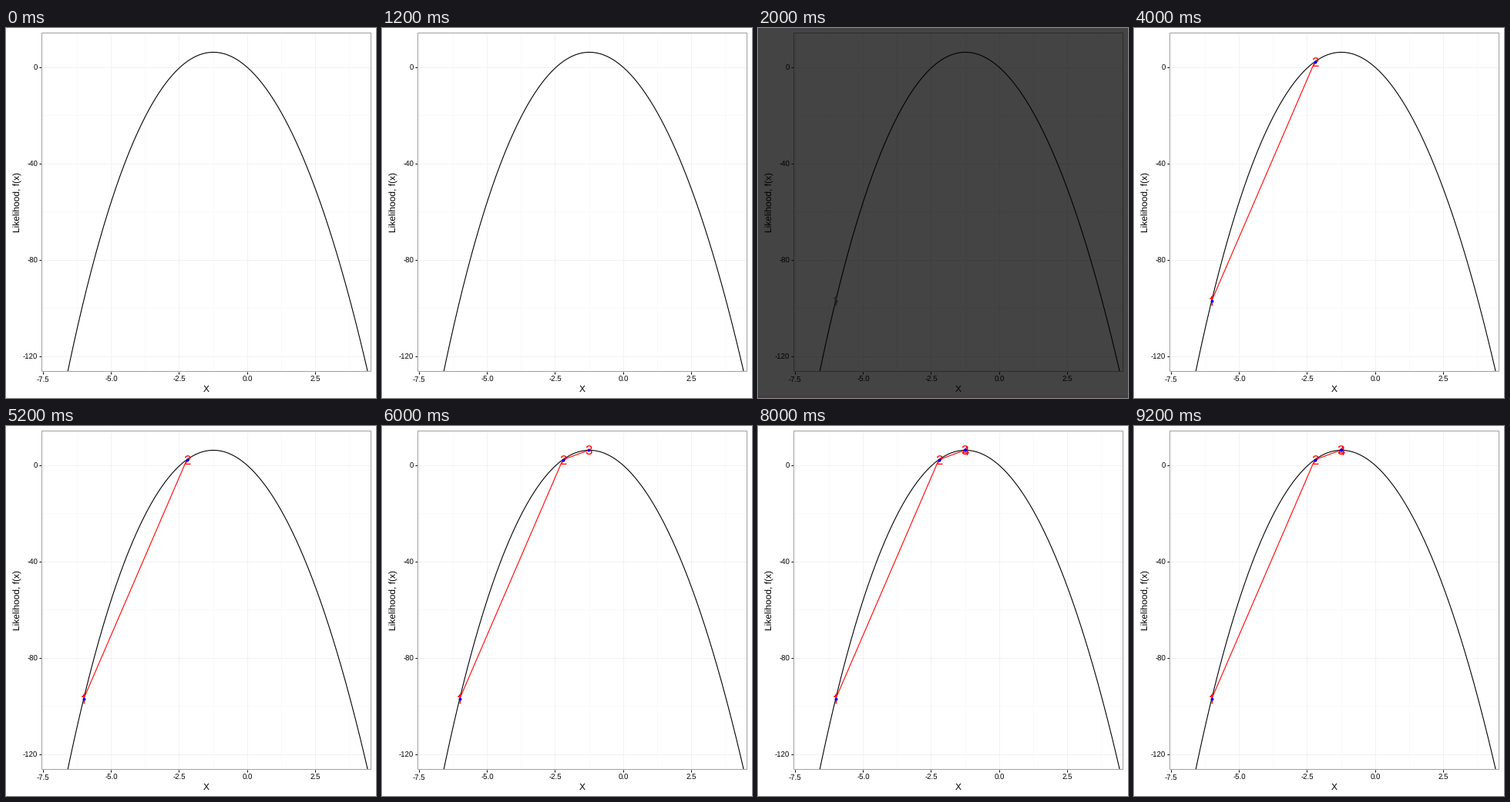
These frames come from a looping animation (480x480 px, 10000 ms). A matplotlib script:

```python
import numpy as np
import matplotlib.pyplot as plt
from matplotlib.animation import FuncAnimation
from matplotlib.patches import Rectangle

SIZE = 480
PT = 0.75  # points per pixel at 96 dpi
LEFT, TOP, RIGHT, BOTTOM = 46, 6, 473, 445
STEPS = 4

plt.rcParams["font.family"] = "Liberation Sans"
plt.rcParams["text.hinting"] = "none"

LIGHT = dict(bg="white", major="#f1f1f1", minor="#f9f9f9", border="#a0a0a0",
             mark="#ff0000", dot="#0000ff")
DARK = dict(bg="#444444", major="#3f3f3f", minor="#414141", border="#2b2b2b",
            mark="#222222", dot="#1c1c1c")


def f(x):
    return -10 * x - 4 * x**2 - 0.01 * x**4


def newton(x):
    slope = -10 - 8 * x - 0.04 * x**3
    bend = -8 - 0.12 * x**2
    return x - slope / bend


def px(x):
    return 312.85 + 35.35 * x


def py(y):
    return 50.9 - 3.125 * y


fig = plt.figure(figsize=(5, 5), dpi=96)
ax = fig.add_axes([0, 0, 1, 1])
ax.set_xlim(0, SIZE)
ax.set_ylim(SIZE, 0)
ax.axis("off")


def line(xs, ys, color="black", width=1.0, **kw):
    return ax.plot(xs, ys, color=color, lw=width * PT, **kw)[0]


def text(x, y, s, size, **kw):
    kw = dict(ha="center", va="baseline") | kw
    return ax.text(x, y, s, fontsize=size * PT, **kw)


def grid(xs, ys):
    style = dict(zorder=1, solid_capstyle="butt")
    return ([line([px(x)] * 2, [TOP, BOTTOM], **style) for x in xs]
            + [line([LEFT, RIGHT], [py(y)] * 2, **style) for y in ys])


def label(n, x, y):
    if n == 1:  # a one without a foot
        return line([x - 2.6, x - 0.4, x + 0.6, x + 0.6],
                    [y - 2.8, y - 3.4, y - 5.6, y + 6.5], width=1.5,
                    solid_capstyle="butt", zorder=6)
    return text(x, y + 6.2, str(n), 17, zorder=6)


x_ticks = np.arange(-7.5, 2.6, 2.5)
y_ticks = np.arange(-120, 1, 40)
minor = grid(x_ticks + 1.25, y_ticks[:-1] + 20)
major = grid(x_ticks, y_ticks)

for x in x_ticks:
    line([px(x)] * 2, [BOTTOM + 1, BOTTOM + 4], solid_capstyle="butt")
    text(px(x) + 0.3, 459, f"{x:.1f}", 9.6)
for y in y_ticks:
    line([LEFT - 3, LEFT], [py(y)] * 2, solid_capstyle="butt")
    text(41.2, py(y) + 3.8, str(y), 9.6, ha="right")
text(260, 472, "X", 12)
text(19, 226, "Likelihood, f(x)", 12, rotation=90, rotation_mode="anchor")

panel = Rectangle((LEFT, TOP), RIGHT - LEFT, BOTTOM - TOP, fill=False,
                  lw=PT, zorder=4)
ax.add_patch(panel)
strip = Rectangle((0, 477), SIZE, 3, color="#453e42", lw=0, zorder=0)
ax.add_patch(strip)

xs = np.linspace(-7.55, 4.55, 400)
curve = line(px(xs), py(f(xs)), width=1.1, zorder=3)
curve.set_clip_path(panel)

roots = [-6.0]
while len(roots) < STEPS:
    roots.append(newton(roots[-1]))
roots = np.array(roots)
sx, sy = px(roots), py(f(roots))

path = line([], [], width=1.1, zorder=5)
labels = [label(i + 1, x, y) for i, (x, y) in enumerate(zip(sx, sy))]
dots = ax.plot([], [], "o", ms=4 * PT, mew=0, zorder=7)[0]


def draw(k):
    dark = k == 1
    theme = DARK if dark else LIGHT
    fig.set_facecolor(theme["bg"])
    strip.set_visible(dark)
    panel.set_edgecolor(theme["border"])
    for name, lines in (("major", major), ("minor", minor)):
        for ln in lines:
            ln.set_color(theme[name])
    path.set_data(sx[:k], sy[:k])
    path.set_color(theme["mark"])
    dots.set_data(sx[:k], sy[:k])
    dots.set_color(theme["dot"])
    for i, mark in enumerate(labels):
        mark.set_visible(i < k)
        mark.set_color(theme["mark"])
    return []


anim = FuncAnimation(fig, draw, frames=STEPS + 1, interval=2000,
                     init_func=lambda: draw(0), repeat=True, repeat_delay=0)
plt.show()
```
